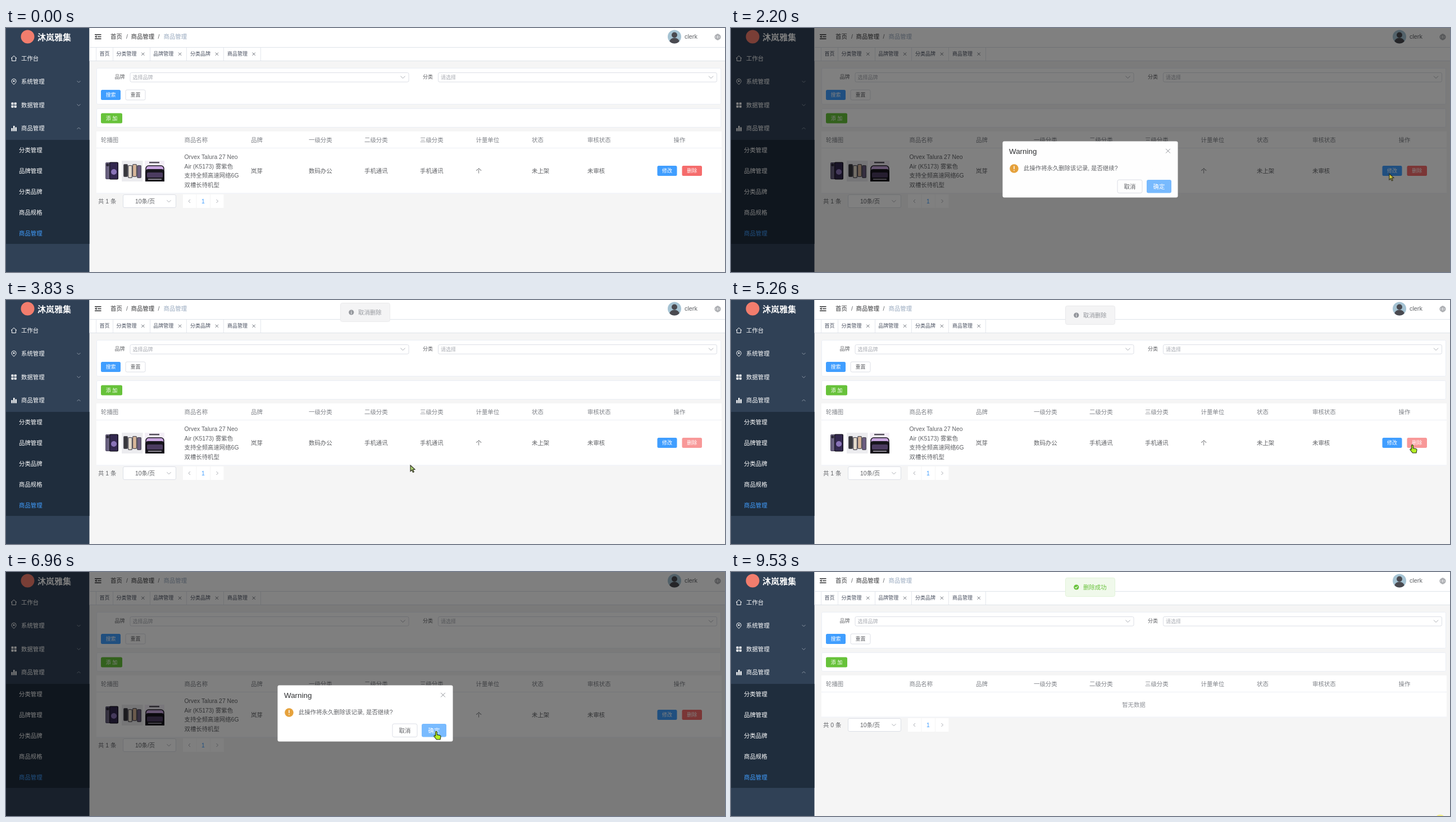
Recreate the animation shown at these times as an HTML page. Size 1280x434 px, loop 9660 ms.

```html
<!DOCTYPE html>
<html lang="zh-CN">
<head>
<meta charset="utf-8">
<title>商品管理</title>
<style>
html, body { margin: 0; width: 100%; height: 100%; overflow: hidden; background: #f5f5f5; }
svg { display: block; width: 100vw; height: 100vh; font-family: "Liberation Sans", "Noto Sans CJK SC", "Noto Sans CJK", sans-serif; }
text { white-space: pre; }
</style>
</head>
<body>
<svg id="stage" viewBox="0 0 1280 434"></svg>
<script>
const LOOP = 9660;
const BLUE = '#409eff', GREEN = '#67c23a', RED = '#f56c6c', GREY = '#606266', DARK = '#303133', LINE = '#dcdfe6';

// Shape helpers; text is placed by its vertical middle.
const text = (x, y, s, fill = GREY, size = 10.4, attrs = '') =>
  `<text x="${x}" y="${y + size * 0.37}" font-size="${size}" fill="${fill}" ${attrs}>${s}</text>`;
const mid = (x, y, s, fill, size, attrs = '') => text(x, y, s, fill, size, `text-anchor="middle" ${attrs}`);
const rect = (x, y, w, h, fill, stroke = 'none', r = 0, attrs = '') =>
  `<rect x="${x}" y="${y}" width="${w}" height="${h}" rx="${r}" fill="${fill}" stroke="${stroke}" ${attrs}/>`;
const circle = (x, y, r, fill) => `<circle cx="${x}" cy="${y}" r="${r}" fill="${fill}"/>`;
const path = (d, stroke, width = 1, fill = 'none', attrs = '') =>
  `<path d="${d}" stroke="${stroke}" stroke-width="${width}" fill="${fill}" ${attrs}/>`;
const group = (id, ...parts) => `<g id="${id}">${parts.join('')}</g>`;
const chevron = (x, y, color, s = 4, up = 1) => path(`M${x - s} ${y - s / 2 * up}l${s} ${s * up}l${s} ${-s * up}`, color);
const side = (x, y, dir) => path(`M${x - 1.5 * dir} ${y - 3}l${3 * dir} 3l${-3 * dir} 3`, '#a8abb2');
const cross = (x, y, s, color) => path(`M${x - s} ${y - s}l${2 * s} ${2 * s}m0 ${-2 * s}l${-2 * s} ${2 * s}`, color);
const button = (x, y, w, label, fill, color = '#fff', stroke = 'none', id = '') =>
  rect(x, y, w, 18, fill, stroke, 2.5, id && `id="${id}"`) + mid(x + w / 2, y + 9, label, color, 9, 'font-weight="500"');

function sidebar() {
  const items = [['工作台', 54], ['系统管理', 95.5], ['数据管理', 137], ['商品管理', 178.5]];
  const subs = ['分类管理', '品牌管理', '分类品牌', '商品规格', '商品管理'];
  return rect(0, 0, 148.5, 434, '#304156') + rect(0, 199, 148.5, 185, '#1f2d3d') +
    circle(38.5, 15.5, 12, '#f27d6d') + text(56, 16.5, '沐岚雅集', '#fff', 15, 'font-weight="700"') +
    items.map(([s, y], i) => text(27, y, s, '#fff') + (i ? chevron(129.5, y, '#8a95a3', 3, i == 3 ? -1 : 1) : '')).join('') +
    subs.map((s, i) => text(23, 217.5 + i * 37, s, i == 4 ? BLUE : '#fff')).join('') +
    path('M9 54l5-4.5l5 4.5M10.5 53v5.5h7v-5.5', '#fff') +
    path('M14 100.5c-2.5-2.5-4-4-4-6a4 4 0 0 1 8 0c0 2-1.5 3.500-4 6z', '#fff') + circle(14, 94.5, 1.4, '#fff') +
    [[9.5, 132.5], [14.7, 132.5], [9.5, 137.7], [14.7, 137.7]].map(([x, y]) => rect(x, y, 4, 4, '#fff', 'none', 0.6)).join('') +
    rect(9.5, 178, 2.4, 5.5, '#fff') + rect(13, 174, 2.4, 9.500, '#fff') + rect(16.500, 176.500, 2.4, 7, '#fff');
}

function header() {
  const tabs = ['分类管理', '品牌管理', '分类品牌', '商品管理'];
  return rect(148.5, 0, 1131.5, 58, '#fff') +
    path('M148.5 34.500H1280M148.5 58.500H1280', '#dfe3ea') +
    path('M158 11.700h11.500M163 15.500h6.500M158 19.300h11.500', DARK, 1.500) + path('M161.500 13.200v4.600l-3.500-2.300z', 'none', 0, DARK) +
    text(186, 15.5, '首页', DARK) + text(214, 15.5, '/') + text(222.5, 15.5, '商品管理', DARK) +
    text(270.5, 15.5, '/') + text(280.5, 15.5, '商品管理', '#97a8be') +
    circle(1190, 15.5, 12, '#a5c3d3') + circle(1190, 12.5, 5, '#4a4a50') +
    path('M1181.500 24a8.500 6.500 0 0 1 17 0a12 12 0 0 1-17 0z', 'none', 0, '#4a4a50') +
    text(1208, 15.5, 'clerk', GREY, 10.8) +
    path('M1262 16a5 5 0 0 1 10 0a5 5 0 0 1-10 0h10M1267 11c-3 3-3 7 0 10c3-3 3-7 0-10M1263 13.500h8M1263 18.500h8', '#777a80', 0.8) +
    path('M160.500 35v23M190.500 35v23', '#e4e7ed') + text(166.5, 46, '首页', '#495060', 9) +
    tabs.map((s, i) => {
      const x = 196.5 + i * 65.8;
      return text(x, 46, s, '#495060', 9) + cross(x + 47.3, 46.3, 2.6, '#6b7078') + path(`M${Math.round(x + 59) + 0.5} 35v23`, '#e4e7ed');
    }).join('');
}

function filters() {
  const field = (x, label, hint) => text(x - 27, 87, label, GREY, 9) +
    rect(x + 0.5, 79.5, 496, 16.5, '#fff', LINE, 2.5) + text(x + 5, 87.5, hint, '#a8abb2', 9) + chevron(x + 486, 87.5, '#a8abb2');
  return rect(161.5, 71.5, 1111, 64, '#fff', '#ebeef5', 2) + rect(161.5, 143.5, 1111, 33, '#fff', '#ebeef5', 2) +
    field(220.5, '品牌', '选择品牌') + field(769, '分类', '请选择') +
    button(169, 110, 35, '搜索', BLUE) + button(213, 110, 35, '重置', '#fff', GREY, LINE) + button(169, 151.5, 38, '添 加', GREEN);
}

function thumbs() {
  const phone = (x, y, w, h, body, screen) => rect(x, y, w, h, body, 'none', 2) + rect(x + 1.2, y + 1.2, w - 2.4, h - 2.4, screen, 'none', 1.2);
  return phone(177, 239, 12, 30, '#56506a', '#6a6280') + circle(181, 243.500, 2.500, '#2a2735') +
    phone(184, 238.500, 16, 31, '#17151f', '#33284f') + circle(192, 256, 5, '#8a74b8') +
    rect(206, 236, 37.5, 37, '#ececef') +
    ['#37373c', '#e4dccd', '#d8b79a', '#6a5c80'].map((c, i) => phone(209 + i * 8, 242 + i % 2 * 2, 8, 23, '#55535c', c)).join('') +
    rect(247, 236, 35, 37, '#f3eef6') + rect(255, 238, 18, 2.5, '#55505c') +
    path('M249 256v-6a5 5 0 0 1 5-5h22a5 5 0 0 1 5 5v6z', '#1b1820', 1.500, '#c9a6e0') +
    path('M248 273v-17a5 5 0 0 1 5-5h24a5 5 0 0 1 5 5v17z', 'none', 0, '#17151c') +
    rect(251, 257, 28, 9, '#4c3c60', 'none', 2) + path('M253 269h24', '#d9d2e2', 1.2);
}

function table() {
  const heads = [[169, '轮播图'], [317.5, '商品名称'], [436, '品牌'], [539, '一级分类'], [638, '二级分类'],
    [737, '三级分类'], [836.5, '计量单位'], [936, '状态'], [1035, '审核状态'], [1188.5, '操作']];
  const cells = [[436, '岚芽'], [539, '数码办公'], [638, '手机通讯'], [737, '手机通讯'], [836.5, '个'], [936, '未上架'], [1035, '未审核']];
  const name = ['Orvex Talura 27 Neo', 'Air (K5173) 雾紫色', '支持全频高速网络6G', '双槽长待机型'];
  const sheet = h => rect(161, 184, 1113, h, '#fff') + path(`M161 ${183.5 + h}H1274`, '#ebeef5');
  return group('filled', sheet(110.5), thumbs(),
      name.map((s, i) => text(317.5, 229 + i * 16.8, s)).join(''),
      cells.map(([x, s]) => text(x, 254, s)).join(''),
      button(1159.5, 245, 35, '修改', BLUE), button(1203.5, 245, 35.5, '删除', RED, '#fff', 'none', 'remove'),
      text(164, 308, '共 1 条')) +
    group('empty', sheet(74.5), mid(717, 236, '暂无数据', '#909399'), text(164, 272, '共 0 条')) +
    heads.map(([x, s]) => text(x, 199, s, '#7f8288', 10.4, 'font-weight="500"')).join('') + path('M161 213.500H1274', '#ebeef5') +
    group('pager', rect(208.5, 296.5, 94, 23, '#fff', LINE, 2.5), text(230, 308, '10条/页'), chevron(290, 308, '#a8abb2', 3.5),
      rect(315, 296, 23.5, 24, '#fff'), rect(339.5, 296, 23.5, 24, '#fff'), rect(364, 296, 23.5, 24, '#fff'),
      side(326.5, 308, -1), mid(351, 308, '1', BLUE), side(376, 308, 1));
}

const toast = (id, label, color, fill, stroke, mark) => group(id, rect(595.5, 10.5, 88, 33, fill, stroke, 3),
  circle(614.8, 27, 4.6, color), path(mark, '#fff', 1.1), text(627, 27, label, color));

function dialog() {
  return group('mask', rect(0, 0, 1280, 434, '#000', 'none', 0, 'fill-opacity=".5"'),
    group('box', rect(483.5, 201.5, 312, 100, '#fff', 'none', 3),
      text(495, 218.7, 'Warning', DARK, 13.4), cross(778, 218.7, 3.8, '#909399'),
      circle(504, 250, 7.8, '#e6a23c'), path('M504 245.500v5.500M504 252.700v1.600', '#fff', 1.5),
      text(521, 249.5, '此操作将永久删除该记录, 是否继续?'),
      rect(688, 270, 44, 23.5, '#fff', LINE, 3, 'id="cancel"'), mid(710, 282, '取消', GREY, 10.4, 'id="cancelText"'),
      rect(740, 270, 44, 23.5, '#79bbff', 'none', 3, 'id="confirm"'), mid(762, 282, '确定', '#fff', 10.4, 'font-weight="500"')));
}

const cursor = () => group('cursor',
  path('M0 0V10.700L2.600 8.400L4.500 12.600L6.300 11.800L4.400 7.700L8 7.400Z', '#2b2b1c', 1.1, '#d6cd3a', 'id="arrow"'),
  path('M-1.500 1a1.400 1.400 0 0 1 2.800 0v4.500l5.400 1.200a1.800 1.800 0 0 1 1.300 2l-1 5.300h-6.500l-4.500-5.500a1.300 1.300 0 0 1 2-1.500l.5.500z',
    '#26301a', 1.1, '#b5ee24', 'id="hand"'));

stage.innerHTML = rect(0, 0, 1280, 434, '#f5f5f5') + sidebar() + header() + filters() + table() +
  toast('info', '取消删除', '#909399', '#f4f4f5', '#e9e9eb', 'M614.800 24.300v1.300M614.800 26.500v3.300') +
  toast('success', '删除成功', GREEN, '#f0f9eb', '#e1f3d8', 'M612.500 27l1.700 1.700l3-3.300') +
  dialog() + `<ellipse id="glow" cx="1262.5" cy="434.5" rx="6.5" ry="3" fill="#f6f08a"/>` + cursor();

// Rows are [ms, value, easing towards the next row]; without easing the value holds.
function play(id, prop, rows) {
  const frames = [...rows, [LOOP, rows[rows.length - 1][1]]]
    .map(([ms, value, easing = 'step-end']) => ({ offset: ms / LOOP, [prop]: value, easing }));
  document.getElementById(id).animate(frames, { duration: LOOP, iterations: Infinity });
}
const move = (x, y) => `translate(${x}px, ${y}px)`;
const toggle = (on, off, times, first = off) =>
  [[0, first], ...times.map((ms, i) => [ms, (i % 2 ? first : first === off ? on : off)])];

const fade = (low, high) => [[0, low], [1915, low, 'ease'], [2215, high], [3600, high, 'ease'], [3820, low],
  [5297, low, 'ease'], [5597, high], [7030, high, 'ease'], [7280, low]];
play('mask', 'opacity', fade(0, 1));
play('box', 'opacity', fade(0, 1));
play('box', 'transform', fade(move(0, -15), move(0, 0)));

play('info', 'opacity', [[0, 0], [3610, 0, 'ease'], [3910, 1], [6590, 1, 'ease'], [6830, 0]]);
play('info', 'transform', [[0, move(0, -34)], [3610, move(0, -34), 'ease'], [4010, move(0, 0)], [6590, move(0, 0), 'ease'], [6990, move(0, -34)]]);
play('success', 'opacity', [[0, 0], [7200, 0, 'ease'], [7500, 1]]);
play('success', 'transform', [[0, move(0, -34)], [7200, move(0, -34), 'ease'], [7600, move(0, 0)]]);

play('filled', 'opacity', [[0, 1], [7200, 0]]);
play('empty', 'opacity', [[0, 0], [7200, 1]]);
play('pager', 'transform', [[0, move(0, 0)], [7200, move(0, -36)]]);

play('remove', 'fill', toggle('#f89898', RED, [1390, 1900, 3600, 5297]));
play('confirm', 'fill', toggle(BLUE, '#79bbff', [3480, 3830]));
play('cancel', 'fill', toggle('#ecf5ff', '#fff', [2750, 3830]));
play('cancel', 'stroke', toggle(BLUE, LINE, [2750, 3830]));
play('cancelText', 'fill', toggle(BLUE, GREY, [2750, 3830]));

const hands = [1400, 1915, 2760, 3640, 4450, 5297, 6270, 7050];
play('hand', 'opacity', toggle(1, 0, hands));
play('arrow', 'opacity', toggle(0, 1, hands));
play('arrow', 'fill', toggle('#a9cf72', '#d6cd3a', [3640, 4450]));
play('cursor', 'opacity', toggle(1, 0, [130, 8920]));
play('glow', 'opacity', toggle(1, 0, [9530]));
play('cursor', 'transform', [
  [0, 1188, 373], [130, 1188, 373, 'ease-out'], [350, 1217, 346],
  [680, 1217, 346, 'ease-in-out'], [1430, 1225, 255],
  [2060, 1225, 255, 'ease-in-out'], [2680, 725, 294, 'linear'], [2820, 703, 286],
  [3620, 703, 286, 'linear'], [3830, 720, 294, 'ease-in-out'], [4380, 1215, 269, 'linear'], [4530, 1213, 258],
  [5530, 1213, 258, 'ease-in-out'], [6200, 767, 286, 'linear'], [6270, 766, 284],
  [8300, 766, 284, 'ease-in-out'], [8920, 1266, 436]
].map(([ms, x, y, easing]) => [ms, move(x, y), easing]));
</script>
</body>
</html>
```
